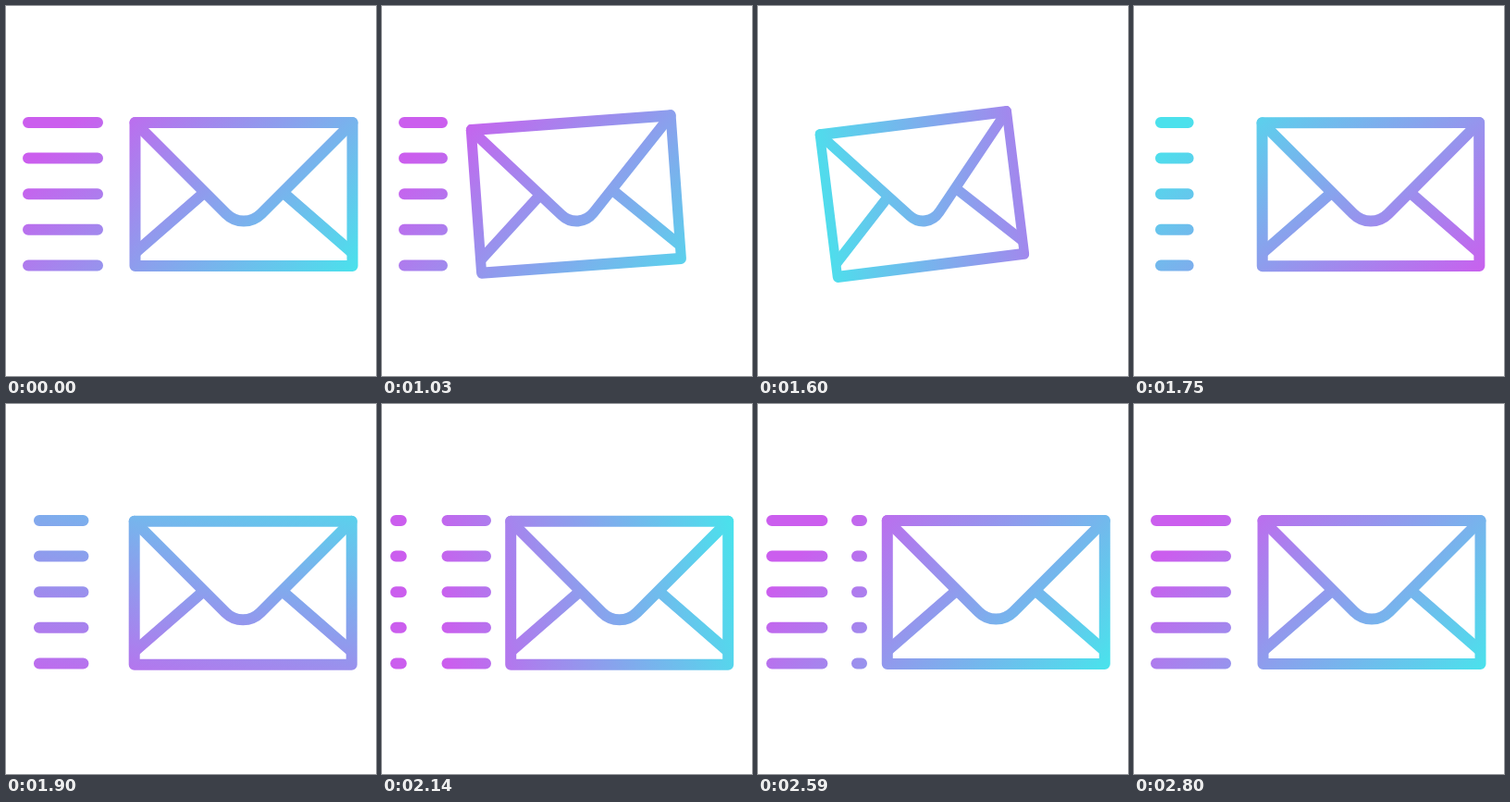
An HTML page that plays this animation: 400 by 400 pixels, repeating every 2.83 s.

```html
<!DOCTYPE html>
<html lang="en">
<head>
<meta charset="utf-8">
<title>Sending mail</title>
<style>
  html, body { margin: 0; width: 100%; height: 100%; overflow: hidden; background: #fff; }
  svg { display: block; width: 100%; height: 100%; }
</style>
</head>
<body>
<svg viewBox="0 0 400 400">
  <defs>
    <linearGradient id="tint" gradientUnits="userSpaceOnUse">
      <stop offset="0" stop-color="#cb5eee"/>
      <stop offset="1" stop-color="#4be1ec"/>
    </linearGradient>
    <mask id="ink" maskUnits="userSpaceOnUse" x="0" y="0" width="400" height="400">
      <g fill="none" stroke="#fff" stroke-width="12" stroke-linecap="round" stroke-linejoin="round">
        <path id="trails"/>
        <g id="envelope">
          <path d="M-117.5-77.5h235v155h-235z"/>
          <path d="M-117.5-77.5L-18.8 21.2A26.6 26.6 0 0 0 18.8 21.2L117.5-77.5"/>
          <path d="M-43-1.5L-116.5 62.5M43-1.5L116.5 62.5"/>
        </g>
      </g>
    </mask>
  </defs>
  <rect width="400" height="400" fill="url(#tint)" mask="url(#ink)"/>
</svg>
<script>
const LOOP = 2830, HOLD = 1030, STEP = 30, START = 1000, END = 2800;
const tint = document.getElementById('tint');
const trails = document.getElementById('trails');
const envelope = document.getElementById('envelope');

const clamp = x => Math.min(1, Math.max(0, x));
const smooth = x => x * x * (3 - 2 * x);

// Cubic Bezier easing with handles (x1, 0) and (x2, 1)
function ease(x, x1, x2) {
  let lo = 0, hi = 1;
  for (let i = 0; i < 24; i++) {
    const s = (lo + hi) / 2, r = 1 - s;
    if (3 * r * r * s * x1 + 3 * r * s * s * x2 + s * s * s < x) lo = s; else hi = s;
  }
  return smooth(lo);
}

// Smooth interpolation through [time, value] keys
function track(t, keys) {
  if (t <= keys[0][0]) return keys[0][1];
  for (let i = 1; i < keys.length; i++) {
    const [t0, a] = keys[i - 1], [t1, b] = keys[i];
    if (t <= t1) return a + (b - a) * smooth((t - t0) / (t1 - t0));
  }
  return keys[keys.length - 1][1];
}

// How far the envelope is drawn back, 0 to 1
function pull(t) {
  if (t < 1536) return 1 - (1 - clamp((t - START) / 222)) ** 4;
  return 1 - ease(clamp((t - 1536) / 240), 0.37, 0.3);
}

function drawEnvelope(t) {
  const p = pull(t);
  const x = 257 - 107 * p + track(t, [[1700, 0], [1900, -0.8], [2140, -0.3], [2410, 0.5], [2800, 0]]);
  const y = 203.5 + track(t, [[1700, 0], [1900, 0.8], [2140, 0.8], [2410, 0]]);
  envelope.setAttribute('transform',
    `translate(${x} ${y}) rotate(${-9.5 * p}) scale(${1 - 0.18 * p} 1)`);
}

function drawTrails(t) {
  const left = 15, width = 97, rest = 0.093;
  const shrinking = t < 1500;
  const length = shrinking
    ? 0.773 * clamp(1 - 1.03 * pull(t))
    : track(t, [[1610, 0], [1850, 0.49], [2410, 0.485], [2800, 0.773]]);
  const turns = shrinking ? 0 : 2.877 * ((END - t) / 900) ** 2.055;
  const from = (rest - turns + 100) % 1, to = from + length;
  const spans = length < 0.005 ? [] : to > 1 ? [[from, 1], [0, to - 1]] : [[from, to]];
  let d = '';
  for (let row = 0; row < 5; row++) {
    for (const [a, b] of spans) {
      d += `M${left + a * width} ${126 + 38.6 * row}H${left + b * width}`;
    }
  }
  trails.setAttribute('d', d);
}

function drawTint(t) {
  const angle = Math.PI * (0.25 + 2 * ease((t - START) / (END - START), 0.37, 0.38));
  const cx = 225, cy = 205, dx = 165 * Math.cos(angle), dy = 165 * Math.sin(angle);
  const ends = { x1: cx - dx, y1: cy - dy, x2: cx + dx, y2: cy + dy };
  for (const name in ends) tint.setAttribute(name, ends[name]);
}

function draw(time) {
  const t = time < HOLD ? START : HOLD + STEP * Math.floor((time - HOLD) / STEP);
  drawEnvelope(t);
  drawTrails(t);
  drawTint(t);
}

const begin = performance.now();
function tick() {
  draw((performance.now() - begin) % LOOP);
  requestAnimationFrame(tick);
}
tick();
</script>
</body>
</html>
```
